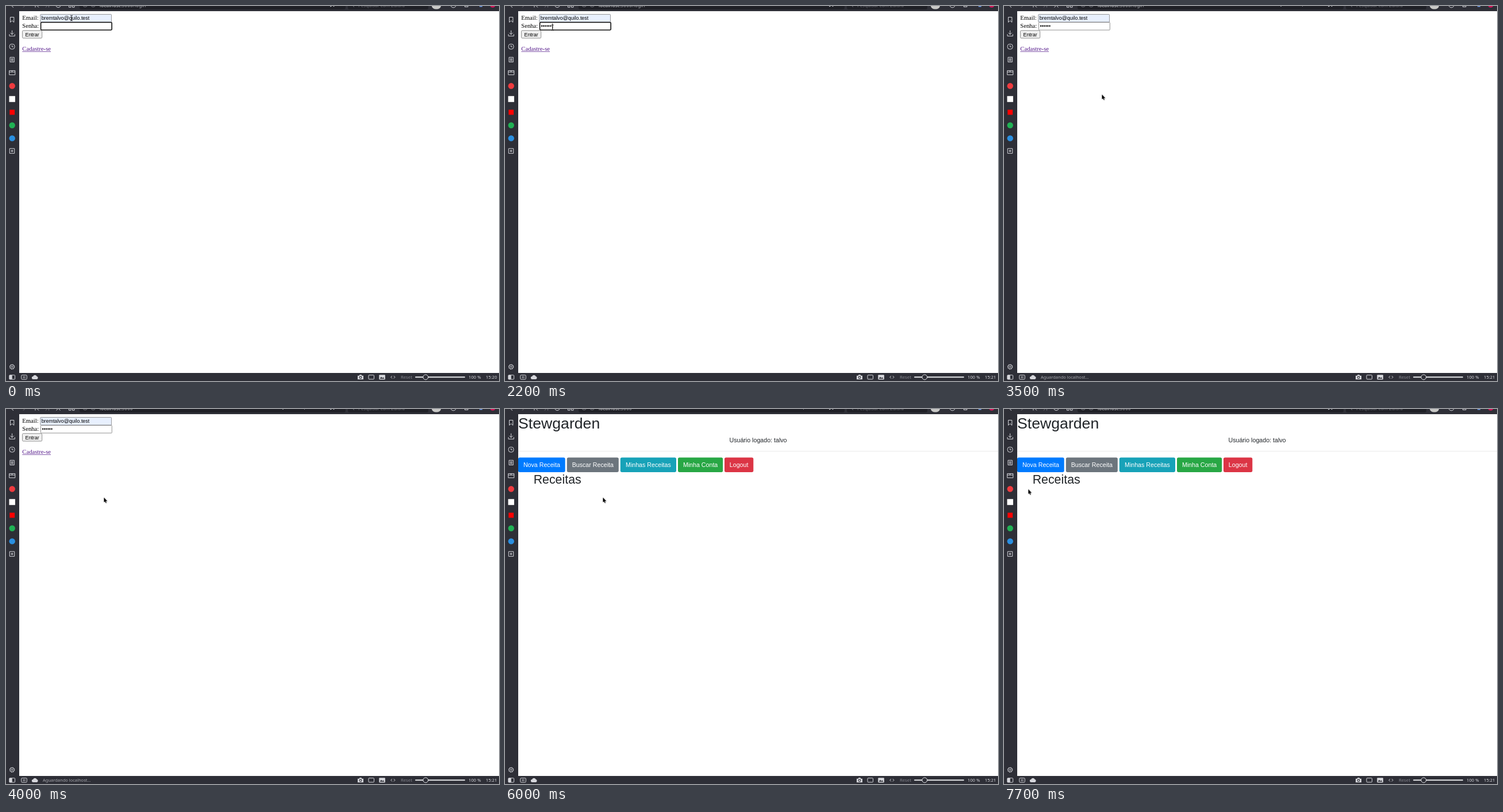
These frames come from a looping animation (858 px wide and 653 px high, 8 s). An HTML page:

```html
<!DOCTYPE html>
<html lang="pt-BR">
<head>
<meta charset="utf-8">
<title>Login</title>
<style>
html, body { margin: 0; width: 100%; height: 100%; overflow: hidden; background: #2e2f37; }
svg { display: block; width: 858px; height: 653px; }
text { white-space: pre; }

.ui { font-family: "Noto Sans", "Open Sans", sans-serif; font-size: 7.7px; fill: #d6d7dc; }
.serif { font-family: "Liberation Serif", "Times New Roman", serif; font-size: 10.67px; }
.sans { font-family: "Liberation Sans", Arial, sans-serif; font-size: 10.67px; fill: #212529; }
.field { font-family: "Liberation Sans", Arial, sans-serif; font-size: 8.89px; fill: #000; }
.buttons text { fill: #fff; text-anchor: middle; }
.icons { fill: none; stroke: #d6d7dc; stroke-width: 1; }
.solid { fill: #d6d7dc; stroke: none; }
.dim { stroke: #74757d; }

/* Everything switches in hard steps on one 8 s clock. */
.a { animation: 8s step-end infinite; }
.login { animation-name: login; }
.home { animation-name: home; }
.three { animation-name: three; }
.five { animation-name: five; }
.six { animation-name: six; }
.caret { animation-name: caret; }
.ring { animation-name: ring; }
.blur { animation-name: blur; }
.hover { animation-name: hover; }
.beam { animation-name: beam; }
.arrow { animation-name: arrow; }
.before { animation-name: before; }
.after { animation-name: five; }
.loading { animation-name: loading; }
.idle { animation-name: idle; }
.path { animation-name: path; }
.mark1 { animation-name: mark1; }
.mark2 { animation-name: mark2; }

@keyframes login { 0% { opacity: 1 } 55%, 100% { opacity: 0 } }
@keyframes home { 0% { opacity: 0 } 55%, 100% { opacity: 1 } }
@keyframes three { 0% { opacity: 0 } 6.25%, 100% { opacity: 1 } }
@keyframes five { 0% { opacity: 0 } 20%, 100% { opacity: 1 } }
@keyframes six { 0% { opacity: 0 } 21.25%, 100% { opacity: 1 } }
@keyframes before { 0% { opacity: 1 } 20%, 100% { opacity: 0 } }
@keyframes ring { 0% { opacity: 1 } 40%, 100% { opacity: 0 } }
@keyframes blur { 0% { opacity: 0 } 40%, 100% { opacity: 1 } }
@keyframes hover { 0% { opacity: 0 } 31.25% { opacity: 1 } 43.75%, 100% { opacity: 0 } }
@keyframes loading { 0% { opacity: 0 } 43.75% { opacity: 1 } 55%, 100% { opacity: 0 } }
@keyframes idle { 0% { opacity: 1 } 43.75% { opacity: 0 } 55%, 100% { opacity: 1 } }
@keyframes path { 0% { opacity: 1 } 50%, 100% { opacity: 0 } }
@keyframes mark1 { 0% { opacity: 0 } 43.75% { opacity: 1 } 75%, 100% { opacity: 0 } }
@keyframes mark2 { 0% { opacity: 0 } 43.75% { opacity: 1 } 78.75%, 100% { opacity: 0 } }
@keyframes caret {
  0% { opacity: 0; transform: translate(62px, 0) }
  6.25% { opacity: 1; transform: translate(72.3px, 0) }
  20% { opacity: 1; transform: translate(78.7px, 0) }
  21.25% { opacity: 1; transform: translate(82px, 0) }
  35%, 100% { opacity: 0; transform: translate(82px, 0) }
}
@keyframes beam {
  0% { opacity: 1; transform: translate(114px, 21px) }
  6.25% { opacity: 1; transform: translate(86.5px, 37px) }
  10% { opacity: 1; transform: translate(87.5px, 41.5px) }
  11.25% { opacity: 1; transform: translate(85.5px, 37.3px) }
  15% { opacity: 1; transform: translate(85.5px, 38px) }
  27.5% { opacity: 1; transform: translate(83px, 37.5px) }
  28.75% { opacity: 1; transform: translate(76px, 38px) }
  30% { opacity: 1; transform: translate(66px, 39.5px) }
  31.25%, 100% { opacity: 0; transform: translate(66px, 39.5px) }
}
@keyframes arrow {
  0% { opacity: 0; transform: translate(55px, 44px) }
  31.25% { opacity: 1; transform: translate(54px, 45px) }
  32.5% { opacity: 1; transform: translate(47.6px, 48px) }
  43.75% { opacity: 1; transform: translate(170.4px, 154px) }
  85% { opacity: 1; transform: translate(174px, 143.4px) }
  88.75% { opacity: 1; transform: translate(155.4px, 151px) }
  92.5% { opacity: 1; transform: translate(53.4px, 142.3px) }
  96.25%, 100% { opacity: 1; transform: translate(42.3px, 139.6px) }
}
</style>
</head>
<body>
<svg viewBox="0 0 858 653">
  <rect width="858" height="653" fill="#2e2f37"/>
  <rect x="23" y="9" width="835" height="630" fill="#fff"/>

  <!-- address bar -->
  <g fill="#1f2026">
    <rect x="128" y="-12" width="463" height="18" rx="3"/>
    <rect x="595" y="-12" width="140" height="18" rx="3"/>
  </g>
  <g class="icons">
    <path d="M8.5 -1.5L13 2.7"/>
    <path class="dim" d="M34 -1.5L30 2.5M69 2.5L73 -1.5M74.5 -2V2.5"/>
    <path d="M51 -2V2.5M53 -1.5L57 2.5"/>
    <path class="a idle" d="M86.5 -2A4.5 4.5 0 0 0 95.5 -2"/>
    <path class="a loading" d="M87.5 2.5L91 -1L94.5 2.5"/>
    <path d="M109.5 -2V2.2H113V-2M115.5 -2V2.2H119V-2"/>
    <path class="dim" d="M134 -2A3.7 3.7 0 0 0 141.5 -2M148 -2A3.7 3.7 0 0 0 155.5 -2M151.7 -1V0"/>
    <path d="M565.5 -1L564.5 1L567.5 -.5M569 -.5L571 1L570 -1"/>
    <path class="dim" d="M603.5 -.5L606 1.8"/>
    <path d="M773.8 -2A4.8 4.8 0 0 0 783.4 -2M776.5 -1H781M798.5 -1V1.5H804V-1"/>
  </g>
  <ellipse cx="749" cy="0" rx="8" ry="5.5" fill="#c9c9c7"/>
  <path d="M824 -1H829V1.5H824Z" fill="#6f9be8"/>
  <circle cx="847" cy="-2" r="4.8" fill="#d1175a"/>
  <g class="ui" style="font-size:8.5px">
    <text x="163" y="1.6">localhost<tspan fill="#a4a5ab">:3000</tspan></text>
    <text class="a path" x="220.7" y="1.6" style="fill:#a4a5ab">/login</text>
    <text x="613" y="1.6" style="font-size:8px;fill:#6c6d75">Pesquisar com Zulora</text>
  </g>
  <rect class="a mark1" x="481" width="2" height="1" fill="#8d8e95"/>
  <rect class="a mark2" x="519" width="1" height="1" fill="#8d8e95"/>

  <!-- side panel -->
  <g class="icons">
    <path d="M7.5 19.5H13.8V28.3L10.6 25.5L7.5 28.3Z"/>
    <path d="M10.6 42.5V49.5M7.5 46.6L10.6 49.7L13.7 46.6M6 49V52.3H15.3V49"/>
    <rect x="6.2" y="66.3" width="8.8" height="8.8" rx="3.6"/>
    <path d="M10.5 68.3V71H12.8"/>
    <path d="M7 89.3H14.3V97.5H7ZM8.6 91.7H12.7M8.6 93.5H12.7M8.6 95.3H12.7"/>
    <path d="M5.7 112.5H15.8V119.8H5.7ZM5.7 115H15.8M10.5 112.5V115"/>
    <path d="M6.3 248.2H14.7V256.6H6.3ZM10.5 250.2V254.6M8.3 252.4H12.7"/>
    <circle cx="10.6" cy="628.3" r="3.7"/>
    <circle cx="10.6" cy="628.3" r="4.2" stroke-dasharray="1.5 1.8"/>
    <circle cx="10.6" cy="628.3" r="1.3"/>
  </g>
  <circle cx="10.7" cy="139.2" r="5.2" fill="#ef3b3f"/>
  <rect x="5.5" y="156.8" width="10.4" height="10.4" fill="#fff"/>
  <rect x="6.3" y="180.6" width="8.8" height="8.8" fill="#f00"/>
  <circle cx="10.7" cy="207.7" r="5.2" fill="#20b154"/>
  <circle cx="10.7" cy="230.4" r="5.2" fill="#2a8fe0"/>

  <!-- status bar -->
  <g class="icons">
    <rect x="5.8" y="642.7" width="9.8" height="7.4" rx="1"/>
    <rect class="solid" x="6" y="643" width="4.7" height="7"/>
    <rect x="26.7" y="642.7" width="9.6" height="7.4" rx="1.5"/>
    <path d="M30.3 644.6V648.2M32.8 644.6V648.2"/>
    <path class="solid" d="M47.5 650A2.5 2.5 0 0 1 47.2 645A3.4 3.4 0 0 1 53.5 644.7A2.7 2.7 0 0 1 53.4 650Z"/>
    <path class="solid" d="M612 643.8H614.5L615.5 642H618.5L619.5 643.8H622V650.2H612Z"/>
    <circle cx="617" cy="646.8" r="1.9" style="stroke:#2e2f37;stroke-width:1.1"/>
    <rect x="631" y="642.7" width="9.5" height="7.2" rx="1"/>
    <rect class="solid" x="649.3" y="642.2" width="10.6" height="8.2" rx="1"/>
    <path d="M650.5 649L653 645.7L655 648L656.5 646.5L658.7 649Z" style="fill:#2e2f37;stroke:none"/>
    <path d="M672 644.1L669.8 646.3L672 648.5M674.8 644.1L677 646.3L674.8 648.5"/>
  </g>
  <rect x="712" y="645.3" width="87" height="2" rx="1" fill="#e4e5e8"/>
  <circle cx="730.3" cy="646.3" r="4.4" fill="#2e2f37" stroke="#e4e5e8"/>
  <g class="ui">
    <text class="a loading" x="64" y="649" style="font-size:7.5px;fill:#a9aab0">Aguardando localhost…</text>
    <text x="687" y="649" style="fill:#85868e">Reset</text>
    <text x="805" y="649">100 %</text>
    <text class="a before" x="835" y="649">15:20</text>
    <text class="a after" x="835" y="649">15:21</text>
  </g>

  <!-- login form -->
  <g class="a login">
    <g class="serif">
      <text x="28.3" y="24.4">Email:</text>
      <text x="28.3" y="38.4">Senha:</text>
      <text x="28.3" y="77.9" fill="#551a8b">Cadastre-se</text>
      <rect x="28.3" y="79" width="49.8" height=".7" fill="#551a8b"/>
    </g>
    <g stroke="#767676" stroke-width=".8">
      <rect x="59.8" y="14.6" width="123.8" height="13.4" rx="1" fill="#e8f0fe"/>
      <rect class="a blur" x="60.5" y="28.5" width="123.8" height="13.4" rx="1" fill="#fff"/>
      <rect x="28.5" y="42.7" width="34.2" height="13.3" rx="1.7" fill="#efefef"/>
      <rect class="a hover" x="28.5" y="42.7" width="34.2" height="13.3" rx="1.7" fill="#e2e2e2" stroke="#4f4f4f"/>
    </g>
    <rect class="a ring" x="60.6" y="28.5" width="123.6" height="13.3" rx="1.6" fill="#fff" stroke="#101010" stroke-width="1.6"/>
    <g class="field">
      <text x="61.7" y="24.4">bremtalvo@quilo.test</text>
      <text x="45.6" y="52.5" text-anchor="middle">Entrar</text>
      <text class="a three" x="62.4" y="38.4">•••</text>
      <text class="a five" x="71.7" y="38.4">••</text>
      <text class="a six" x="78" y="38.4">•</text>
    </g>
    <rect class="a caret" y="30.5" width=".8" height="9.3" fill="#000"/>
  </g>

  <!-- recipe page -->
  <g class="a home sans">
    <text x="23" y="34.2" style="font-size:26.67px">Stewgarden</text>
    <text x="440.5" y="58" text-anchor="middle">Usuário logado: talvo</text>
    <rect x="23" y="73" width="835" height=".8" fill="#000" fill-opacity=".1"/>
    <g class="buttons">
      <rect x="23" y="84.6" width="81.7" height="25.3" rx="2.7" fill="#007bff"/>
      <text x="63.9" y="100.9">Nova Receita</text>
      <rect x="107.8" y="84.6" width="90" height="25.3" rx="2.7" fill="#6c757d"/>
      <text x="152.8" y="100.9">Buscar Receita</text>
      <rect x="200.8" y="84.6" width="97.2" height="25.3" rx="2.7" fill="#17a2b8"/>
      <text x="249.4" y="100.9">Minhas Receitas</text>
      <rect x="301" y="84.6" width="78.2" height="25.3" rx="2.7" fill="#28a745"/>
      <text x="340.1" y="100.9">Minha Conta</text>
      <rect x="382" y="84.6" width="50.3" height="25.3" rx="2.7" fill="#dc3545"/>
      <text x="407.1" y="100.9">Logout</text>
    </g>
    <text x="49.7" y="130.4" style="font-size:21.33px">Receitas</text>
  </g>

  <!-- pointers -->
  <path class="a beam" d="M-2 -4.7Q0 -4.7 0 -3.7Q0 -4.7 2 -4.7M0 -3.7V3.7M-2 4.7Q0 4.7 0 3.7Q0 4.7 2 4.7" fill="none" stroke="#111" stroke-width=".9"/>
  <path class="a arrow" d="M0 0V8.6L1.9 6.9L3.3 10L4.6 9.4L3.3 6.4H6Z" fill="#000" stroke="#fff" stroke-width=".7" paint-order="stroke"/>
</svg>
</body>
</html>
```
